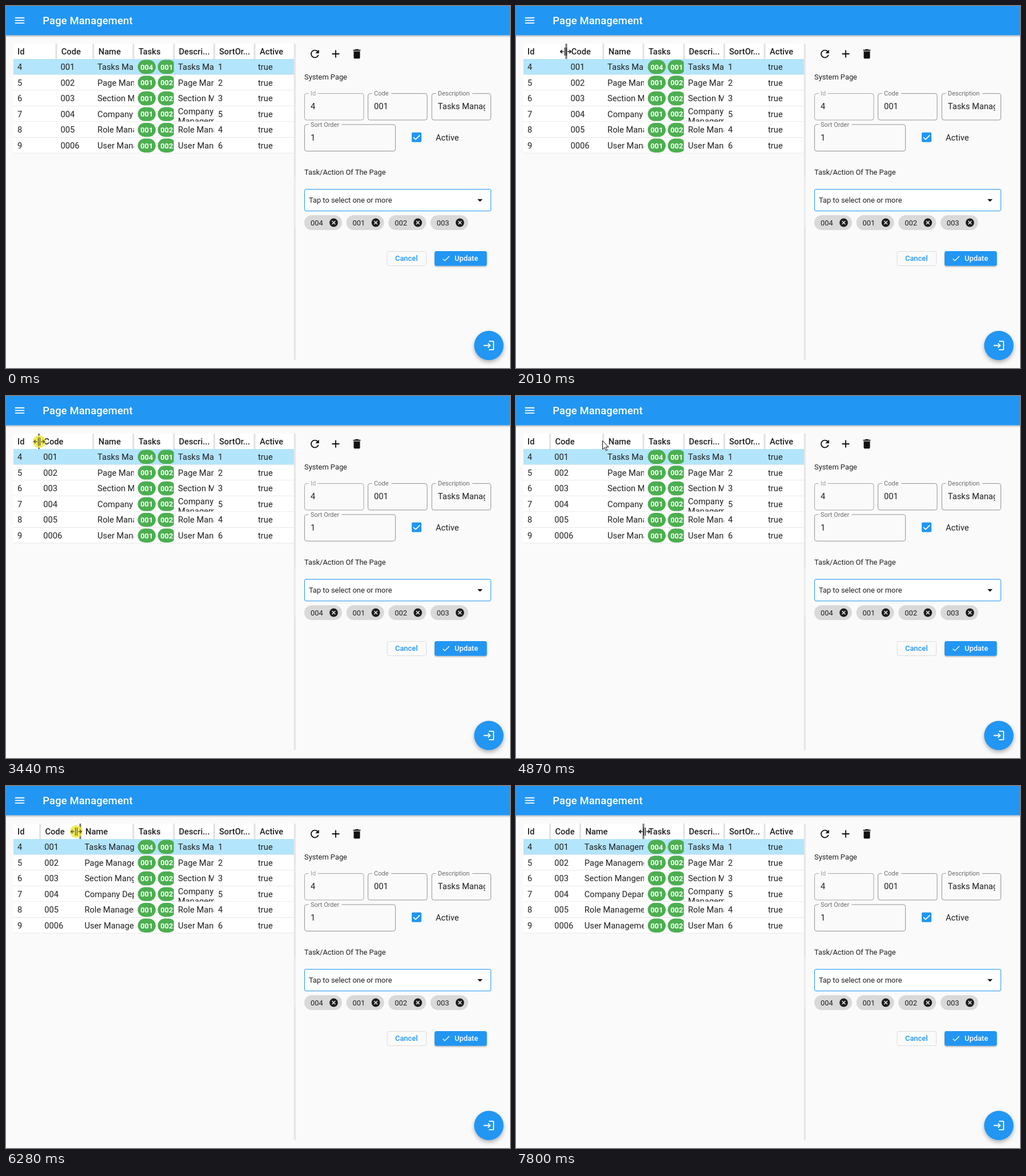
Recreate the animation shown at these times as an HTML page. Size 882 by 635 pixels, loop 8000 ms.

```html
<!DOCTYPE html>
<html lang="en">
<head>
<meta charset="utf-8">
<title>Page Management</title>
<style>
html, body { margin: 0; width: 100%; height: 100%; overflow: hidden; background: #fafafa; }
svg { display: block; width: 882px; height: 635px; font: 14.7px Roboto, sans-serif; fill: #212121; }
.medium { font-weight: 500; }
.small { font-size: 12.86px; }
.label { font-size: 11.03px; fill: #6b6b6b; }
.chip { font-size: 12.86px; font-weight: 700; fill: #fff; text-anchor: middle; }
</style>
</head>
<body>
<svg id="stage" viewBox="0 0 882 635"></svg>
<script>
const LOOP = 8000, STEP = 67, BLUE = '#2196f3', SCALE = 0.91875;
const stage = document.getElementById('stage');

const text = (x, y, s, attrs = '') => `<text x="${x}" y="${y}" ${attrs}>${s}</text>`;
const rect = (x, y, w, h, fill, attrs = '') =>
  `<rect x="${x}" y="${y}" width="${w}" height="${h}" fill="${fill}" ${attrs}/>`;
const clip = (id, x, y, w, h) => `<clipPath id="${id}">${rect(x, y, w, h, '#000')}</clipPath>`;
// 24-unit icon centred on (x, y)
const icon = (x, y, d, fill, size = SCALE) =>
  `<path transform="translate(${x} ${y}) scale(${size}) translate(-12 -12)" d="${d}" fill="${fill}"/>`;

const ICONS = {
  menu: 'M3 18h18v-2H3zM3 13h18v-2H3zM3 6v2h18V6z',
  refresh: 'M17.65 6.35C16.2 4.9 14.21 4 12 4c-4.42 0-7.99 3.58-7.99 8s3.57 8 7.99 8c3.73 0 6.84-2.55 7.73-6h-2.08c-.82 2.33-3.04 4-5.65 4-3.31 0-6-2.69-6-6s2.69-6 6-6c1.66 0 3.14.69 4.22 1.78L13 11h7V4z',
  add: 'M19 13h-6v6h-2v-6H5v-2h6V5h2v6h6z',
  trash: 'M6 19c0 1.1.9 2 2 2h8c1.1 0 2-.9 2-2V7H6zM19 4h-3.5l-1-1h-5l-1 1H5v2h14z',
  check: 'M9 16.17L4.83 12l-1.42 1.41L9 19 21 7l-1.41-1.41z',
  login: 'M11 7L9.6 8.4l2.6 2.6H2v2h10.2l-2.6 2.6L11 17l5-5zM20 19h-8v2h8c1.1 0 2-.9 2-2V5c0-1.1-.9-2-2-2h-8v2h8z',
  drop: 'M7 10l5 5 5-5z'
};

const ROWS = [
  ['4', '001', 'Tasks Management', 'Tasks Management', '1'],
  ['5', '002', 'Page Management', 'Page Management', '2'],
  ['6', '003', 'Section Mangement', 'Section Mangement', '3'],
  ['7', '004', 'Company Department', 'Company', '5'],
  ['8', '005', 'Role Management', 'Role Management', '4'],
  ['9', '0006', 'User Management', 'User Management', '6']
];
const ROW_TOP = 93, ROW_H = 27.6;

function taskChip(x, y, label) {
  return rect(x, y - 12.2, 31.4, 24.4, '#4caf50', 'rx="12.2"') + text(x + 15.7, y + 4.7, label, 'class="chip"');
}

function table() {
  const mid = i => ROW_TOP + ROW_H * (i + 0.5);
  const base = i => mid(i) + 5.2;
  const column = (k, x) => ROWS.map((row, i) => text(x, base(i), row[k])).join('');
  const header = (x, s) => text(x, 84.8, s, 'class="medium"');
  const rowBacks = ROWS.map((_, i) => {
    const y = ROW_TOP + ROW_H * i;
    return rect(13, y, 491, ROW_H, i ? '#fff' : '#b3e5fc') + rect(13, y + ROW_H - 1, 491, 1, i ? '#e6e6e6' : '#c5d9e2');
  }).join('');
  const chips = ROWS.map((_, i) =>
    taskChip(230.6, mid(i), i ? '001' : '004') + taskChip(265.6, mid(i), i ? '002' : '001')).join('');
  const handles = [88, 152.7, 223, 294, 364.5, 435].map(x =>
    rect(x - 1.5, 66, 3, 27, '#e2e2e2', 'class="handle"')).join('');
  return rect(13, 66, 491, 27, '#fff') + rowBacks + header(20, 'Id') + column(0, 20)
    + `<g id="code">${header(8.7, 'Code')}${column(1, 7.6)}</g>`
    + `<g clip-path="url(#nameClip)"><g id="name">${header(9, 'Name')}${column(2, 7.4)}</g></g>`
    + header(232, 'Tasks') + `<g clip-path="url(#taskClip)">${chips}</g>`
    + header(302.5, 'Descri...') + header(373, 'SortOr...') + header(444, 'Active')
    + `<g clip-path="url(#descClip)">${ROWS.map((r, i) => text(301, i === 3 ? 189.6 : base(i), r[3])).join('')}</g>`
    + `<g clip-path="url(#wrapClip)">${text(301, 206.8, 'Management')}</g>`
    + column(4, 371) + ROWS.map((_, i) => text(441, base(i), 'true')).join('') + handles;
}

function field(x, y, w, label, gap, value, dim) {
  return rect(x + 0.5, y + 0.5, w - 1, 46.5, 'none', `rx="3.7" stroke="${dim ? '#a5a5a5' : '#929292'}"`)
    + rect(x + 7.5, y - 1, gap, 3, '#fafafa')
    + text(x + 11, y + 4.3, label, `class="label" ${dim ? 'style="fill:#a0a0a0"' : ''}`)
    + text(x + 11, y + 28.2, value, x > 740 ? 'clip-path="url(#fieldClip)"' : '');
}

function removableChip(label, i) {
  const x = 522 + 73.6 * i;
  return rect(x, 367, 66, 26, '#d9d9d9', 'rx="13"') + text(x + 11, 384.7, label, 'class="small"')
    + `<circle cx="${x + 51.5}" cy="380" r="7.4" fill="#1c1c1c"/>`
    + `<path d="M${x + 48.6} 377.1l5.8 5.8m0 -5.8l-5.8 5.8" stroke="#d9d9d9" stroke-width="1.5"/>`;
}

function form() {
  return icon(540.5, 84, ICONS.refresh, '#111') + icon(577, 84, ICONS.add, '#111') + icon(614, 84, ICONS.trash, '#111')
    + text(522, 129, 'System Page', 'class="small"')
    + field(522, 153, 104.5, 'Id', 16, '4', true) + field(633, 153, 104.5, 'Code', 34, '001')
    + field(744.7, 153, 104.3, 'Description', 64, 'Tasks Management')
    + field(522, 207.5, 160, 'Sort Order', 58, '1')
    + rect(710, 221.7, 17, 17, BLUE, 'rx="1.8"')
    + '<path d="M713 230.4l3.8 3.7 7.4 -7.5" fill="none" stroke="#fff" stroke-width="1.8"/>'
    + text(752, 235.5, 'Active')
    + text(522, 296.3, 'Task/Action Of The Page', 'class="small"')
    + rect(522.5, 321.5, 326, 38, '#fff', `rx="2.5" stroke="${BLUE}"`)
    + text(530, 345.3, 'Tap to select one or more', 'class="small"') + icon(829.5, 340.5, ICONS.drop, '#111')
    + ['004', '001', '002', '003'].map(removableChip).join('')
    + rect(667, 430.5, 68.5, 25, '#fafafa', 'rx="3" stroke="#dcdcdc"')
    + text(681, 447.4, 'Cancel', `class="small medium" style="fill:${BLUE}"`)
    + rect(750, 430, 91.5, 25.7, BLUE, 'rx="3.5" filter="url(#raised)"')
    + icon(770, 443, ICONS.check, '#fff', 0.69)
    + text(785, 447.4, 'Update', 'class="small medium" style="fill:#fff"')
    + `<circle cx="845" cy="595.5" r="25.8" fill="${BLUE}" filter="url(#floating)"/>` + icon(845, 595.5, ICONS.login, '#fff');
}

const shadow = (id, dy, blur, alpha) =>
  `<filter id="${id}" x="-30%" y="-30%" width="160%" height="180%"><feDropShadow dx="0" dy="${dy}" stdDeviation="${blur}" flood-opacity="${alpha}"/></filter>`;

stage.innerHTML = '<defs>'
  + clip('nameClip', 0, 60, 224, 200) + clip('taskClip', 224, 90, 69.7, 172)
  + clip('descClip', 295, 90, 68.8, 172) + clip('wrapClip', 295, 190, 68.8, 12.7)
  + clip('fieldClip', 755, 160, 83.5, 35)
  + shadow('raised', 1.5, 1.2, 0.3) + shadow('floating', 3.5, 3.5, 0.3) + shadow('bar', 1.5, 1.8, 0.35) + '</defs>'
  + rect(0, 0, 882, 635, '#fafafa')
  + table() + rect(503.8, 66, 3.2, 555, '#e6e6e6') + rect(503.8, 301, 3.2, 86, '#ececec') + form()
  + rect(-10, -10, 902, 61.2, BLUE, 'filter="url(#bar)"') + icon(24, 25.3, ICONS.menu, '#fff')
  + text(64.3, 32.2, 'Page Management', 'class="medium" style="font-size:18.4px;letter-spacing:.14px;fill:#fff"')
  + `<g id="cursor">
      <circle id="press" r="11" fill="#efe640" fill-opacity=".85"/>
      <path id="arrow" d="M0.5 .5V15.5L4 12.3L6.4 17.8L8.7 16.8L6.4 11.5H11z" fill="#fff" stroke="#111"/>
      <path id="resize" d="M-1.5 -7V7M1.5 -7V7M-3.5 0H-9M3.5 0H9M-6.3 -3L-9.3 0L-6.3 3M6.3 -3L9.3 0L6.3 3" fill="none" stroke="#111" stroke-width="1.3"/>
    </g>`;

// start, end, from x, y, to x, y, look, hovered handle
const CURSOR = [
  [180, 800, 764, 616, 97, 74, 'arrow'],
  [1010, 1070, 95, 72, 95, 72, 'arrow'],
  [1070, 1130, 83, 76, 83, 76, 'resize', 0],
  [1130, 1330, 81, 72, 81, 72, 'arrow'],
  [1330, 1740, 82, 72, 91, 79, 'arrow'],
  [1890, 2010, 88, 79, 87, 80, 'resize', 0],
  [2280, 2680, 87, 80, 50, 76, 'press', 0],
  [2680, 2960, 50, 76, 45, 78, 'press', 0],
  [3160, 3440, 45, 78, 58, 80, 'press', 0],
  [3440, 3550, 58, 80, 61, 80, 'press', 0],
  [3550, 3930, 67, 80, 157, 76, 'arrow'],
  [4070, 4270, 157, 76, 155, 75, 'arrow'],
  [4270, 4470, 154, 80, 150, 80, 'resize', 1],
  [4740, 4870, 151, 78, 151, 78, 'arrow'],
  [5540, 5610, 151, 80, 151, 80, 'arrow'],
  [5610, 5880, 153, 83, 153, 83, 'resize', 1],
  [5880, 6280, 153, 83, 123, 80, 'press', 1],
  [6280, 6640, 123, 80, 111, 80, 'press', 1],
  [6980, 7050, 113, 80, 113, 80, 'resize', 1],
  [7050, 7450, 120, 79, 229, 77, 'arrow'],
  [7590, 7800, 225, 78, 225, 80, 'resize', 2]
];
// time and position of the two dragged column edges
const EDGES = [
  [[0, 88], [2280, 88], [2680, 59], [2960, 46], [3160, 46], [3440, 57.6], [3550, 59.7]],
  [[0, 152.7], [5880, 152.7], [6280, 130], [6640, 112], [6710, 112.4]]
];

const el = id => document.getElementById(id);
const handles = [...document.querySelectorAll('.handle')];
const mix = (a, b, p) => a + (b - a) * p;
// progress in whole steps, as the recording advances
const stepped = (t, from, to) =>
  t >= to ? 1 : Math.min(1, Math.floor((t - from) / STEP) * STEP / (to - from));

function edgeAt(keys, t) {
  const i = keys.findLastIndex(k => k[0] <= t), a = keys[i], b = keys[i + 1];
  return b ? mix(a[1], b[1], stepped(t, a[0], b[0])) : a[1];
}

function draw(t) {
  const [code, name] = EDGES.map(keys => edgeAt(keys, t));
  el('code').setAttribute('transform', `translate(${code} 0)`);
  el('name').setAttribute('transform', `translate(${name} 0)`);
  handles[0].setAttribute('x', code - 1.5);
  handles[1].setAttribute('x', name - 1.5);

  const move = CURSOR.findLast(m => m[0] <= t);
  el('cursor').style.display = move ? '' : 'none';
  const [from, to, x0, y0, x1, y1, look, hover] = move || [];
  handles.forEach((h, i) => h.setAttribute('fill', i === hover ? '#777' : '#e2e2e2'));
  if (!move) return;
  let p = stepped(t, from, to);
  if (from === 180) p = 1 - (1 - p) ** 2;
  el('cursor').setAttribute('transform', `translate(${mix(x0, x1, p)} ${mix(y0, y1, p)})`);
  el('arrow').style.display = look === 'arrow' ? '' : 'none';
  el('resize').style.display = look === 'arrow' ? 'none' : '';
  el('resize').style.opacity = look === 'press' ? 0.65 : 1;
  el('press').style.display = look === 'press' ? '' : 'none';
}

const start = performance.now();
function tick() {
  draw((performance.now() - start) % LOOP);
  requestAnimationFrame(tick);
}
tick();
</script>
</body>
</html>
```
